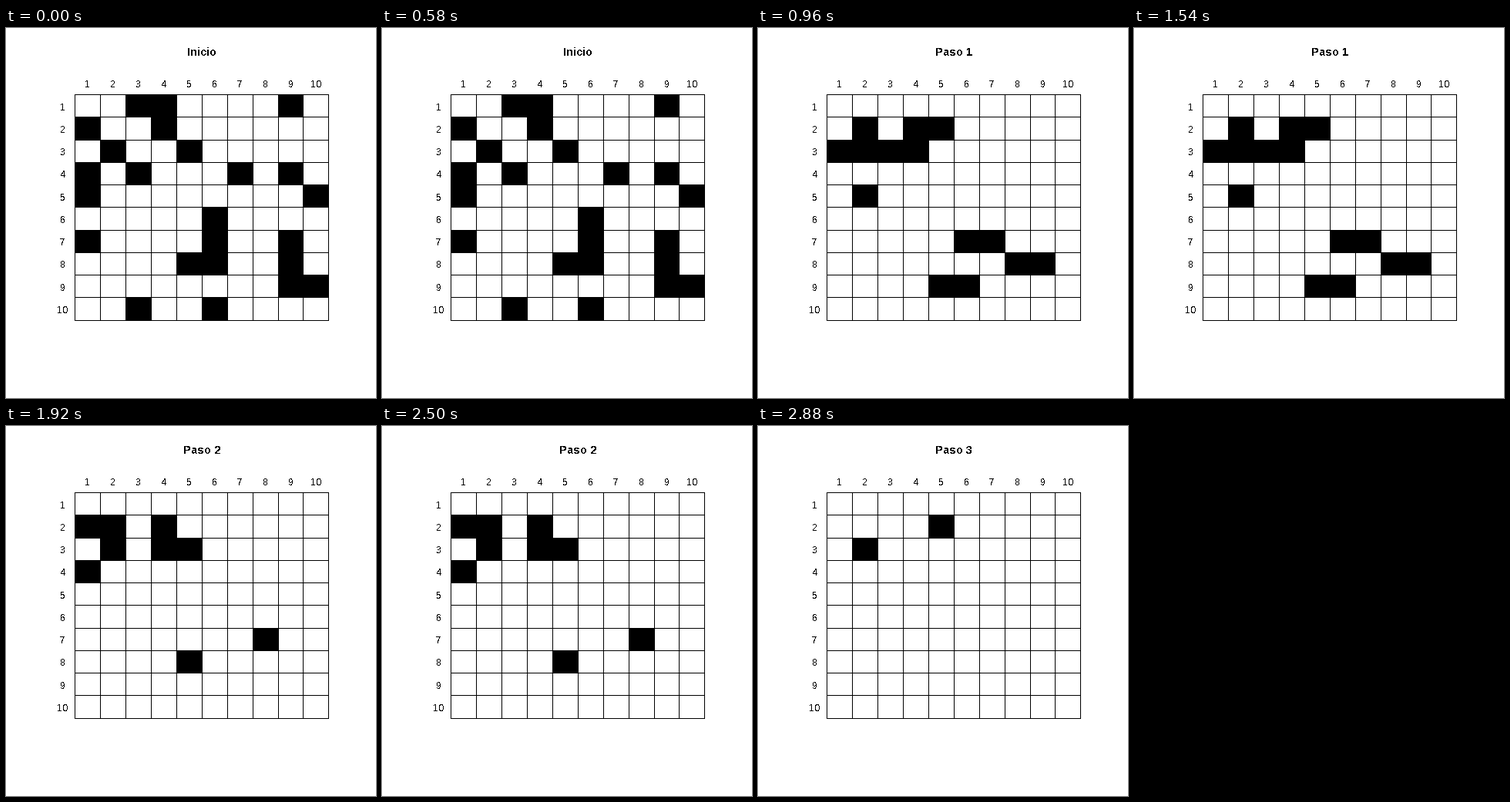
A matplotlib script that plays this animation: 480x480 px, repeating every 3.84 s.

```python
import math

import matplotlib.pyplot as plt
import numpy as np
from matplotlib.animation import FuncAnimation
from matplotlib.patches import Rectangle

plt.rcParams["font.family"] = "Liberation Sans"
plt.rcParams["text.hinting"] = "force_autohint"
plt.rcParams["text.hinting_factor"] = 1

SIZE, DPI = 480, 96
N, STEPS = 10, 4
ORIGIN = 59.04
CELL_W, CELL_H = 390.72 / 11.88, 347.52 / 11.88

# Live columns of each row at the start
START = [(3, 4, 9), (1, 4), (2, 5), (1, 3, 7, 9), (1, 10),
         (6,), (1, 6, 9), (5, 6, 9), (9, 10), (3, 6)]


def px(u):
    return ORIGIN + (u + 0.44) * CELL_W


def py(v):
    return ORIGIN + (v + 0.44) * CELL_H


def evolve(grid):
    """A cell is alive next if exactly three neighbours are alive now."""
    pad = np.pad(grid, 1)
    around = sum(pad[r:r + N, c:c + N]
                 for r in range(3) for c in range(3)) - grid
    return (around == 3).astype(int)


def history():
    grid = np.zeros((N, N), int)
    for row, cols in enumerate(START):
        for col in cols:
            grid[row, col - 1] = 1
    grids = [grid]
    while len(grids) < STEPS:
        grids.append(evolve(grids[-1]))
    return grids


fig = plt.figure(figsize=(SIZE / DPI, SIZE / DPI), dpi=DPI, facecolor="white")
ax = fig.add_axes([0, 0, 1, 1])
ax.set_xlim(0, SIZE)
ax.set_ylim(SIZE, 0)
ax.axis("off")


def box(x, y, w, h):
    return ax.add_patch(Rectangle((x, y), w, h, facecolor="black",
                                  linewidth=0, antialiased=False))


def label(text, u, v):
    left = math.floor(px(u) - 3.5 * len(text))
    ax.text(left, math.floor(py(v) + 6), text, fontsize=9, color="black",
            ha="left", va="baseline", antialiased=False)


xs = [math.floor(px(i + 0.5)) for i in range(N + 1)]
ys = [math.floor(py(i + 0.5)) for i in range(N + 1)]

for x in xs:
    box(x, ys[0], 1, ys[-1] - ys[0] + 1)
for y in ys:
    box(xs[0], y, xs[-1] - xs[0] + 1, 1)
for k in range(1, N + 1):
    label(str(k), k, 0)
    label(str(k), 0, k)

cells = [[box(xs[c], ys[r], xs[c + 1] - xs[c] + 1, ys[r + 1] - ys[r] + 1)
          for c in range(N)] for r in range(N)]
title = ax.text(254, 36, "", fontsize=10.5, fontweight="bold", color="black",
                ha="center", va="baseline", antialiased=False)
grids = history()


def update(step):
    title.set_text(f"Paso {step}" if step else "Inicio")
    for r in range(N):
        for c in range(N):
            cells[r][c].set_visible(bool(grids[step][r, c]))
    return [title]


anim = FuncAnimation(fig, update, frames=STEPS, interval=960,
                     repeat=True, repeat_delay=0, blit=False)
plt.show()
```
